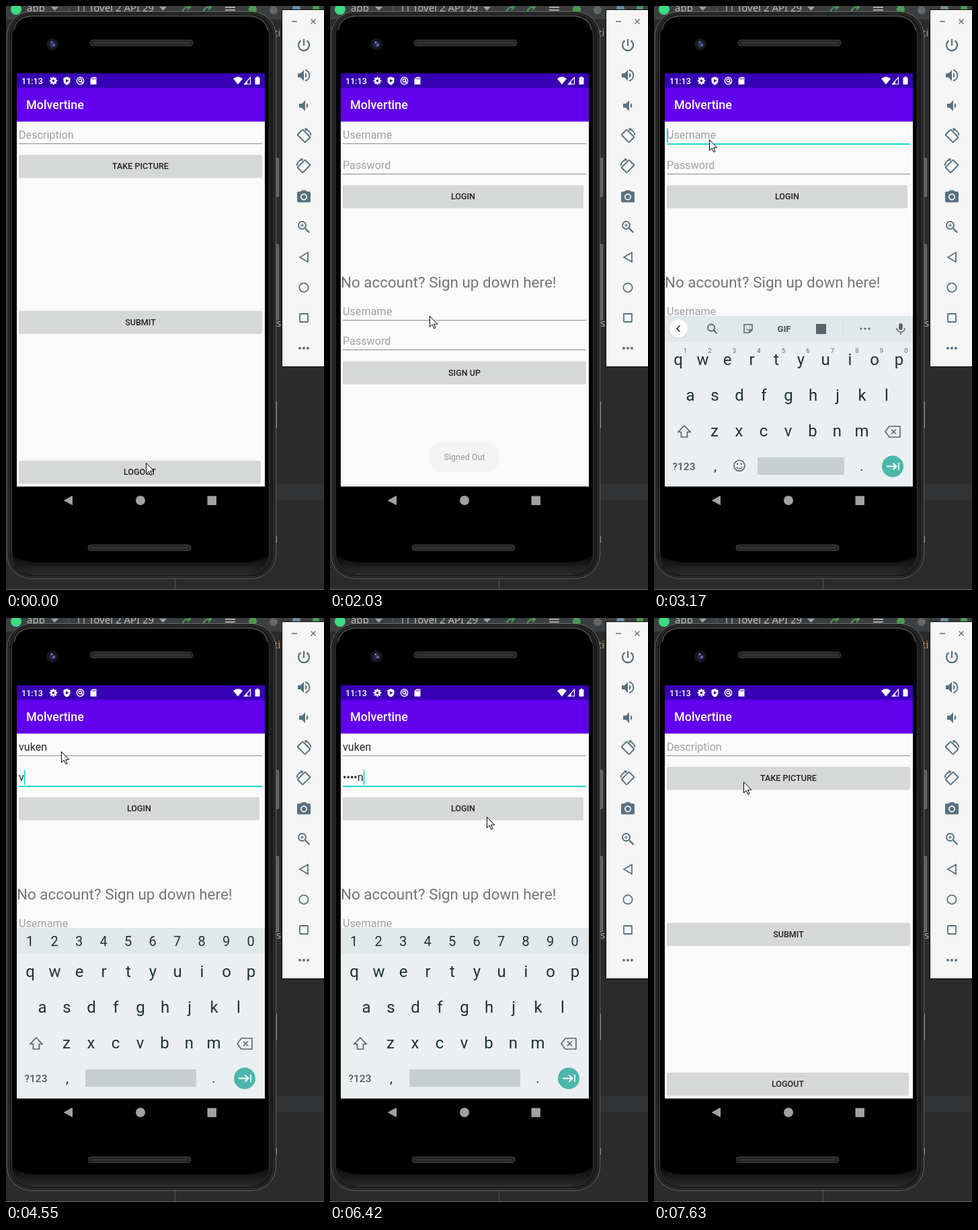
These frames come from a looping animation (473 by 867 pixels, 8 s). An HTML page:

```html
<!DOCTYPE html>
<html lang="en">
<head>
<meta charset="utf-8">
<title>Phone emulator demo</title>
<style>
html, body { margin: 0; width: 100%; height: 100%; overflow: hidden; background: #2b2b2b; }
svg { display: block; width: 473px; height: 867px; font-family: Roboto, sans-serif; }
text { white-space: pre; }
.ide { font-family: "Noto Sans", sans-serif; }
.mid { text-anchor: middle; }
.med { font-weight: 500; }
</style>
</head>
<body>
<svg viewBox="0 0 473 867"></svg>
<script>
const APP = 'Molvertine', USER = 'vuken', LOOP = 8000;
const svg = document.querySelector('svg');

const rect = (x, y, w, h, fill, more = '') =>
  `<rect x="${x}" y="${y}" width="${w}" height="${h}" fill="${fill}" ${more}/>`;
const circle = (x, y, r, fill, more = '') =>
  `<circle cx="${x}" cy="${y}" r="${r}" fill="${fill}" ${more}/>`;
const path = (d, fill, more = '') => `<path d="${d}" fill="${fill}" ${more}/>`;
const text = (x, y, s, size, fill, more = '') =>
  `<text x="${x}" y="${y}" font-size="${size}" fill="${fill}" ${more}>${s}</text>`;
const at = (x, y, body) => `<g transform="translate(${x} ${y})">${body}</g>`;
const group = (id, body) => `<g id="${id}">${body}</g>`;
const stroke = (d, color, width = 2) => path(d, 'none', `stroke="${color}" stroke-width="${width}"`);

// Desktop behind the phone
function desktop() {
  const ide = (x, y, s, fill = '#bbb') => text(x, y, s, 15, fill, 'class="ide"');
  const arrow = x => path(`M${x} 1h11l-5.5 6z`, '#a0a2a4');
  const reload = x => stroke(`M${x} 8a7 7 0 0 1 9 -6M${x + 7} -2l4 4-4 4`, '#4a9b50');
  return rect(0, 0, 473, 867, '#2b2b2b') + rect(0, 0, 473, 20, '#3c3f41') +
    circle(15, 5, 8, '#3ddc84') + ide(31, 8, 'app') + arrow(67) +
    rect(93, 0, 1, 8, '#555') + stroke('M108 8V0M116 8V0', '#a0a2a4', 1.5) +
    ide(123, 8, 'Tovel 2 API 29') + arrow(228) + reload(263) + reload(294) +
    rect(326, 1, 15, 2, '#aaa') + rect(326, 5, 15, 2, '#aaa') + circle(367, 5, 6, '#499c54') +
    circle(398, 6, 6, '#666') + circle(432, 4, 6, '#6c8ca0') + circle(461, 3, 5, '#499c54') +
    ide(399, 45, 'ti', '#c9a26d') + ide(402, 476, 's', '#a9b7c6') +
    rect(390, 709, 83, 25, '#323334') + rect(402, 587, 1, 40, '#888') + rect(402, 787, 1, 10, '#888') +
    rect(251, 849, 1, 18, '#555') + rect(0, 866, 473, 1, '#6a6a6a');
}

function phone() {
  const side = (y, h) => rect(400, y, 5.5, h, '#5c5c5c', 'stroke="#8e8e8e" stroke-width=".8" rx="1"');
  const speaker = (x, y) => rect(x, y, 153, 8.5, '#222', 'rx="4" stroke="#484848"') +
    stroke(`M${x + 4} ${y + 4.2}h145`, '#333', 3);
  const chin = '<linearGradient id="chin" x2="0" y2="1"><stop stop-color="#050505"/>' +
    '<stop offset="1" stop-color="#2a2a2a"/></linearGradient>';
  return chin + side(226, 57) + side(354, 112) +
    rect(1.5, 8.5, 400, 841.5, '#1c1c1c', 'rx="36" stroke="#686868"') +
    rect(4.5, 11.5, 394, 836, 'none', 'rx="33" stroke="#3a3a3a"') +
    rect(8.5, 14.5, 383, 829, '#000', 'rx="30" stroke="#383838"') +
    stroke('M12 36Q15 17 36 15H364Q386 17 389 36', '#666', 1) +
    path('M9 812Q14 824 44 826H356Q386 824 391 812Q390 841 360 843H40Q10 841 9 812Z', 'url(#chin)') +
    circle(69, 57, 9, '#16161c') + circle(69, 57, 5, '#242845') + circle(71, 58, 2.2, '#5366b4') +
    circle(68, 54, 1.2, '#aab') + speaker(125, 50.5) + speaker(122, 800);
}

function sidebar() {
  const c = '#58717f';
  const cone = 'M-9 -3h4l5 -5v16l-5 -5h-4z';
  const turn = `<g transform="rotate(-45)">` +
    rect(-5.5, -8, 11, 16, 'none', `rx="1" stroke="${c}" stroke-width="2"`) + '</g>' +
    stroke('M2 -10A10 10 0 0 1 10.500 -1', c, 1.8) + path('M1 -11.500h5l-4 4z', c);
  const icons = [
    stroke('M0 -9V1M-4.500 -6.500A8 8 0 1 0 4.500 -6.500', c, 2.2),
    path(cone, c) + stroke('M2 -8A8.200 8.200 0 0 1 2 8', c) + path('M2 -4a4.500 4.500 0 0 1 0 8z', c),
    at(2, 0, path(cone, c) + path('M2 -4a4.500 4.500 0 0 1 0 8z', c)),
    turn,
    `<g transform="scale(-1 1)">${turn}</g>`,
    rect(-10, -7.5, 20, 16, c, 'rx="2"') + path('M-5 -7l2-2.500h6l2 2.500z', c) +
      circle(0, .5, 4.1, c, 'stroke="#f6f6f6" stroke-width="1.8"'),
    circle(-2.5, -2.5, 5.5, 'none', `stroke="${c}" stroke-width="2"`) +
      stroke('M2 2L8.500 8.500', c, 2.4) + stroke('M-5 -2.500h5M-2.500 -5v5', c, 1.2),
    stroke('M6 -7V7L-6 0z', c, 1.8),
    circle(0, 0, 6.7, 'none', `stroke="${c}" stroke-width="1.8"`),
    rect(-6, -6, 12, 12, 'none', `rx=".5" stroke="${c}" stroke-width="1.8"`),
    [-6, 0, 6].map(x => circle(x, 0, 2, c)).join('')
  ];
  return rect(410, 5, 64, 531, '#050505') + rect(411, 6, 62, 529, '#f6f6f6') +
    stroke('M425 23h8M453.500 19.500l7 7M460.500 19.500l-7 7', c, 1.4) +
    icons.map((icon, i) => at(443, 58 + 45 * i, icon)).join('');
}

// App screens
const hint = '#a0a0a0', accent = '#03dac5';
const base = rect(16, 100, 369, 655, '#000') + rect(16, 121, 369, 592.4, '#fafafa') +
  rect(16, 121, 369, 50.6, '#6200ee') + rect(16, 100, 369, 21.5, '#3700b3') +
  text(30, 153, APP, 17.96, '#fff', 'class="med"');
const field = (y, label, id = '') => text(19, y, label, 16.16, hint, id && `id="${id}"`) +
  rect(19, y + 7, 362, 1, '#8b8b8b', id && `id="${id}Line"`);
const button = (y, w, label, id = '') =>
  rect(19, y + 1, w, 33.5, '#c4c4c4', 'rx="2" opacity=".5"') +
  rect(19, y, w, 33.5, '#d6d7d7', `rx="2" ${id && `id="${id}"`}`) +
  text(19 + w / 2, y + 21, label, 12.57, '#222', 'class="mid med"');

const login = base + field(197, 'Username', 'user') + field(242, 'Password', 'pass') +
  button(266, 358, 'LOGIN', 'enter') +
  text(16, 418, 'No account? Sign up down here!', 22.45, '#757575') +
  field(459, 'Username') + field(503, 'Password') + button(527.5, 362, 'SIGN UP') +
  rect(0, 0, 1.6, 22, accent, 'id="caret"');
const compose = base + field(197, 'Description') + button(221, 362, 'TAKE PICTURE') +
  button(452.5, 362, 'SUBMIT') + button(675, 360, 'LOGOUT', 'leave');

function systemIcons() {
  const spokes = Array.from({ length: 8 }, (_, i) =>
    rect(-1.2, -5.8, 2.4, 3, '#fff', `transform="rotate(${i * 45})"`)).join('');
  return text(23, 115.5, '11:13', 12.57, '#fff', 'class="med"') +
    at(70.5, 111, spokes + circle(0, 0, 3, 'none', 'stroke="#fff" stroke-width="2.4"')) +
    path('M90.500 105l5 2v4q0 4-5 6.500-5-2.500-5-6.500v-4z', '#fff') + path('M89 108.500l4.500 2.500-4.500 2.500z', '#3700b3') +
    circle(110.5, 111, 5.2, 'none', 'stroke="#fff" stroke-width="1.4"') +
    circle(110.5, 110.5, 2.3, 'none', 'stroke="#fff" stroke-width="1.4"') + stroke('M111 111l4 4', '#fff', 1.4) +
    path('M125.500 108.500l3-3h6v11h-9z', '#fff') + stroke('M129 107v2M131 107v2M133 107v2', '#3700b3', 1) +
    path('M338 108q7-6 14 0l-7 8.500z', '#fff') +
    stroke('M363.500 106v10h-9z', '#fff', 1.2) + path('M359 111v5.500h-5z', '#fff') +
    rect(370.5, 106, 7, 10.5, '#fff', 'rx="1"') + rect(372.5, 104.8, 3, 2, '#fff');
}
const navIcons = path('M86.500 734l12-6.500v13z', '#a2a2a2', 'stroke="#a2a2a2" stroke-linejoin="round"') +
  circle(200, 734, 7, '#a2a2a2') + rect(299.5, 727.5, 13.5, 13.5, '#a2a2a2', 'rx="1"');

function keyboard() {
  const ink = '#20303a', soft = '#56646c';
  const row = (s, x, y, size, fill) => [...s].map((c, i) =>
    text((x + 36.5 * i).toFixed(1), y, c, size, fill, 'class="mid"')).join('');
  const tools =
    circle(85, 477.5, 5, 'none', `stroke="${soft}" stroke-width="1.8"`) + stroke('M88.500 481l5 5', soft) +
    stroke('M134 473h12v8l-4 4h-8zM146 481h-4v4', soft, 1.6) + stroke('M137 479q3 4 6 0M137.500 476v1M142.500 476v1', soft, 1.2) +
    text(193.5, 483.5, 'GIF', 13, soft, 'class="mid" font-weight="900"') +
    rect(241, 472, 15, 15, soft) + rect(281, 470, 1, 19, '#cfd5d8') +
    [308, 314, 320].map(x => circle(x, 479, 1.6, soft)).join('');
  const strip = group('tools', tools) +
    text(200, 484, '', 15, ink, 'class="mid" id="word"') +
    circle(36.5, 480, 13.8, '#d5dadc') + circle(36.5, 479, 13.5, '#fff') +
    stroke('M38.500 474.500l-4.500 4.500 4.500 4.500', '#333', 1.6) +
    rect(364.2, 471, 5.6, 10, soft, 'rx="2.8"') + stroke('M361 478a6 6 0 0 0 12 0M367 484v4', soft, 1.5) +
    row('1234567890', 46.5, 515, 9.5, soft) +
    circle(127, 682.5, 8, 'none', `stroke="${soft}" stroke-width="1.6"`) +
    circle(124, 680, 1.2, soft) + circle(130, 680, 1.2, soft) + stroke('M122.500 684.500q4.500 5 9 0', soft, 1.5);
  return rect(16, 460, 369, 253, '#ebeff1') + rect(16, 460, 369, 38.5, '#e2e7ea') +
    group('textKeys', strip) +
    group('passKeys', row('1234567890', 35.5, 487, 20, ink)) +
    row('qwertyuiop', 36, 533, 24, ink) + row('asdfghjkl', 54, 585.5, 24, ink) + row('zxcvbnm', 90, 638.5, 24, ink) +
    stroke('M45 623l9 9.500h-4.500v7.500h-9v-7.500h-4.500z', soft, 1.7) +
    stroke('M350 624h16v16h-16l-6-8zM353 628.500l7 7M360 628.500l-7 7', soft, 1.6) +
    text(44.5, 688.5, '?123', 15.5, '#4c5a62', 'class="mid med"') +
    text(91, 690, ',', 20, ink, 'class="mid"') + text(309, 690, '.', 20, ink, 'class="mid"') +
    rect(154, 670, 129, 26, '#c8cdd0', 'rx="2" id="space"') +
    circle(355, 683.5, 16, '#4db6ac') +
    stroke('M346 683.500h14M355.500 678.500l5 5-5 5M364 678v11', '#fff', 1.8);
}

svg.innerHTML = '<clipPath id="glass"><rect x="16" y="100" width="369" height="655"/></clipPath>' +
  desktop() + phone() + sidebar() +
  `<g clip-path="url(#glass)">` +
  group('screens', group('login', login) + group('compose', compose)) +
  systemIcons() + navIcons + group('keys', keyboard()) +
  group('toast', rect(148, 647, 104, 44, '#efefef', 'rx="18"') +
    text(200, 674, 'Signed Out', 12.57, '#333', 'class="mid"')) + '</g>' +
  group('mouse', path('M.5 .5V16.500L4.300 13 6.800 18.800 9 17.800 6.600 12.200H11.800Z', '#fff', 'stroke="#000"'));

const $ = id => document.getElementById(id);
const set = (id, attrs) => Object.entries(attrs).forEach(([k, v]) => $(id).setAttribute(k, v));
const show = (id, on) => set(id, { opacity: on ? 1 : 0 });

// The picture refreshes only at these moments: start, end, count
const steps = [0, ...[
  [140, 1080, 8], [1220, 2150, 8], [2270, 3290, 8], [3560, 3970, 4], [4240, 4240, 1],
  [4550, 5090, 5], [5490, 6420, 8], [6540, 6540, 1], [6820, 7630, 7]
].flatMap(([a, b, n]) => Array.from({ length: n }, (_, i) => a + (b - a) * i / Math.max(1, n - 1)))];

const route = [
  [0, 208, 678], [270, 208, 678], [540, 126, 481], [1090, 126, 481], [1600, 138, 211], [1700, 138, 211],
  [2010, 148, 460], [2150, 148, 460], [2560, 82, 198], [5360, 82, 198], [6020, 232, 295],
  [6300, 232, 295], [6400, 233, 295], [6950, 233, 295], [7620, 133, 243], [LOOP, 133, 243]
];
function mouseAt(t) {
  const i = route.findIndex(p => p[0] > t);
  const [a, b] = [route[i - 1], route[i]];
  const u = (t - a[0]) / (b[0] - a[0]), e = u * u * (3 - 2 * u);
  return [1, 2].map(k => Math.round(a[k] + (b[k] - a[k]) * e));
}
const within = (t, a, b) => t >= a && t < b;
const zoom = s => `translate(200.5 427.5) scale(${s}) translate(-200.5 -427.5)`;

function drawScreens(t) {
  const loginOnTop = within(t, 270, 6800);
  const moving = within(t, 270, 400) || within(t, 6800, 6900);
  const [top, under] = loginOnTop ? ['login', 'compose'] : ['compose', 'login'];
  if ($('screens').lastChild !== $(top)) $('screens').append($(top));
  set(top, { transform: zoom(moving ? 0.9853 : 1), opacity: 1 });
  set(under, { transform: zoom(moving ? 1.0455 : 1), opacity: +moving });
  set('enter', { fill: within(t, 6280, 6400) ? '#c6c7c7' : '#d6d7d7' });
  set('leave', { fill: within(t, 130, 400) ? '#c6c7c7' : '#d6d7d7' });
}

function drawFields(t) {
  const typed = t < 3550 ? 0 : Math.min(5, 1 + Math.floor((t - 3550) / 105));
  const count = t < 4550 ? 0 : Math.min(5, 1 + Math.floor((t - 4549) / 135));
  const user = USER.slice(0, typed);
  const pass = count ? '•'.repeat(count - 1) + (t < 6540 ? USER[count - 1] : '•') : '';
  const focus = t < 2700 || t >= 6800 ? '' : t < 4240 ? 'user' : 'pass';
  for (const [id, value, label] of [['user', user, 'Username'], ['pass', pass, 'Password']]) {
    $(id).textContent = value || label;
    set(id, { fill: value ? '#262626' : hint });
    set(id + 'Line', focus === id ? { fill: accent, height: 1.8 } : { fill: '#8b8b8b', height: 1 });
  }
  $('word').textContent = user;
  show('tools', !typed);
  const blinkOff = within(t, 3290, 3550) || (t >= 5490 && (t - 5000) % 1000 >= 500);
  show('caret', focus && !blinkOff);
  if (!focus) return;
  const filled = focus === 'user' ? user : pass;
  const x = 19 + (filled ? $(focus).getComputedTextLength() : 0);
  set('caret', { x, y: focus === 'user' ? 181 : 225.5 });
}

function drawKeyboard(t) {
  const rising = within(t, 2840, 2990), leaving = within(t, 6800, 6900);
  set('keys', {
    opacity: rising ? 0.6 : leaving ? 0.35 : +within(t, 2990, 6800),
    transform: rising ? 'translate(0 24)' : leaving ? 'matrix(1.044 0 0 1.044 -8.8 10.9)' : ''
  });
  const secret = t >= 4240;
  show('textKeys', !secret);
  show('passKeys', secret);
  set('space', secret ? { x: 118, width: 165 } : { x: 154, width: 129 });
}

function draw(now) {
  const clock = now % LOOP;
  const t = steps.filter(s => s <= clock).pop();
  drawScreens(t);
  drawFields(t);
  drawKeyboard(t);
  set('toast', { opacity: within(t, 400, 540) ? 0.4 : within(t, 540, 1900) ? 1 : within(t, 1900, 2140) ? 0.5 : 0 });
  set('mouse', { transform: `translate(${mouseAt(t)})` });
}

const start = performance.now();
function tick() {
  draw(Math.max(0, performance.now() - start));
  requestAnimationFrame(tick);
}
tick();
</script>
</body>
</html>
```
